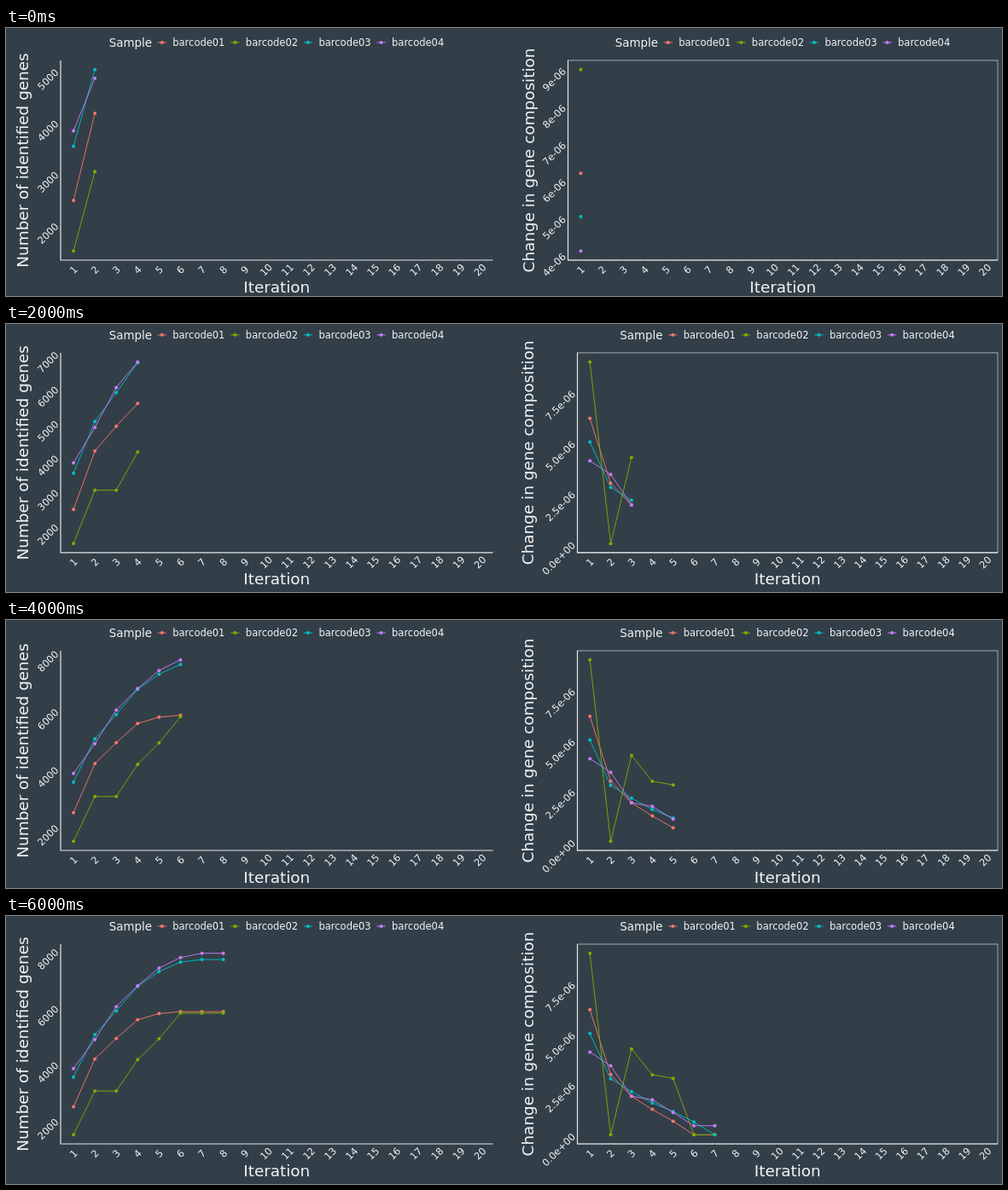
Recreate the animation shown at these times as an HTML page. Size 1167 by 314 pixels, loop 7000 ms.

```html
<!DOCTYPE html>
<html lang="en">
<head>
<meta charset="utf-8">
<title>Gene identification by iteration</title>
<style>
html, body { margin: 0; width: 100%; height: 100%; overflow: hidden; background: #333f48; }
svg { display: block; width: 1167px; height: 314px; font-family: "DejaVu Sans", sans-serif; fill: #f2f3f4; }
</style>
</head>
<body>
<svg id="stage" viewBox="0 0 1167 314"></svg>
<script>
const stage = document.getElementById('stage');
const STEP = 1000;
const HEIGHT = 234;
const TOPS = [38, 34.5, 33.8, 31.8, 36, 32, 33];
const COLORS = ['#f8766d', '#7cae00', '#00bfc4', '#c77cff'];

// Alternating kick that fades with the iteration
const wobble = (i, kick) => i ? kick * (-1) ** i / i ** 2 : 0;

// Growth that levels off after the given number of steps
const rise = (start, end, steps, power, kick) => i => i < steps
  ? end - (end - start) * ((1 - i / steps) ** power + wobble(i, kick))
  : end;

// Hyperbolic decline that reaches its end after the given number of steps
const fall = (start, end, steps, rate, kick) => i => i < steps
  ? end + (start - end) * ((1 + i) ** -rate * (1 - (i / steps) ** 4) + wobble(i, kick))
  : end;

const keys = (...values) => i => values[i] || 0;

const GENES = [
  rise(2473, 5836, 5, 2.6, 0.064),
  rise(1485, 5783, 5, 1, 0.16),
  rise(3528, 7678, 6, 2.1, 0.042),
  rise(3827, 7901, 6, 1.85, -0.035)
];
// In units of 1e-06
const CHANGE = [
  fall(6.2, 0, 5, 1.05, 0),
  keys(9, 0, 4.26, 2.98, 2.8),
  fall(5.03, 0, 6, 0.78, 0.03),
  fall(4.1, 0.45, 5, 0.7, -0.2)
];

const sci = v => v ? v.toFixed(1) + 'e-06' : '0.0e+00';

function line(x1, y1, x2, y2, color) {
  return `<line x1="${x1}" y1="${y1}" x2="${x2}" y2="${y2}" stroke="${color}"/>`;
}

function dot(x, y, color) {
  return `<circle cx="${x}" cy="${y}" r="2" fill="${color}"/>`;
}

function text(str, x, y, size, anchor = 'middle', angle = 0) {
  return `<text transform="translate(${x} ${y}) rotate(${angle})" dy=".36em" font-size="${size}" text-anchor="${anchor}">${str}</text>`;
}

function legend(cx, y) {
  let out = text('Sample', cx - 196.5, y, 13.4, 'start');
  COLORS.forEach((color, i) => {
    const x = cx - 134.5 + i * 85.6;
    out += line(x - 5, y, x + 5, y, color) + dot(x, y, color);
    out += text('barcode0' + (i + 1), x + 12.5, y, 11.5, 'start');
  });
  return out;
}

function panel({ x0, x1, top, curves, count, tick, format, title, titleGap, border }) {
  const bottom = top + HEIGHT;
  const rows = curves.map(f => Array.from({ length: count }, (_, i) => f(i)));
  const all = rows.flat();
  const min = Math.min(...all), max = Math.max(...all);
  const pad = (max - min) * 0.05;
  const low = min - pad, high = max + pad;
  const cx = (x0 + x1) / 2;
  const px = i => x0 + (i + 0.6) * (x1 - x0) / 20.2;
  const py = v => bottom - (v - low) / (high - low) * HEIGHT;

  let out = legend(cx, top - 21);
  if (border) {
    out += `<rect x="${x0}" y="${top}" width="${x1 - x0}" height="${HEIGHT}" fill="none" stroke="#a4a9ad"/>`;
  }
  rows.forEach((row, k) => {
    const pts = row.map((v, i) => px(i) + ',' + py(v)).join(' ');
    out += `<polyline points="${pts}" fill="none" stroke="${COLORS[k]}" stroke-opacity=".9"/>`;
  });
  rows.forEach((row, k) => row.forEach((v, i) => out += dot(px(i), py(v), COLORS[k])));

  for (let v = Math.ceil(low / tick) * tick; v <= high; v += tick) {
    const y = py(v);
    out += line(x0 - 3, y, x0, y, '#333');
    out += text(format(v), x0 - 4.6, y, 11.4, 'end', -45);
  }
  for (let i = 0; i < 20; i++) {
    out += line(px(i), bottom, px(i), bottom + 3, '#333');
    out += text(i + 1, px(i), bottom + 11.3, 11.4, 'middle', -45);
  }
  out += `<path d="M${x0} ${top}V${bottom}H${x1}" fill="none" stroke="#e6e8e9" stroke-width="1.2"/>`;
  out += text('Iteration', cx, bottom + 31, 18.4);
  out += text(title, x0 - titleGap, top + HEIGHT / 2, 18.4, 'middle', -90);
  return out;
}

function draw(n) {
  const top = TOPS[n];
  const odd = n % 2;
  stage.innerHTML = panel({
    x0: 64 + odd, x1: 570.5 - odd / 2, top, curves: GENES, count: n + 2,
    tick: n < 3 ? 1000 : 2000, format: String,
    title: 'Number of identified genes', titleGap: 44.4
  }) + panel({
    x0: (n ? 669.5 : 658.5) - odd / 2, x1: 1162 - odd * 1.7, top, curves: CHANGE, count: n + 1,
    tick: n ? 2.5 : 1, format: n ? sci : v => v + 'e-06', border: true,
    title: 'Change in gene composition', titleGap: n ? 58 : 46.5
  });
}

let current = -1;
const start = performance.now();
function update() {
  const n = Math.floor((performance.now() - start) / STEP) % TOPS.length;
  if (n !== current) draw(current = n);
  requestAnimationFrame(update);
}
update();
</script>
</body>
</html>
```
